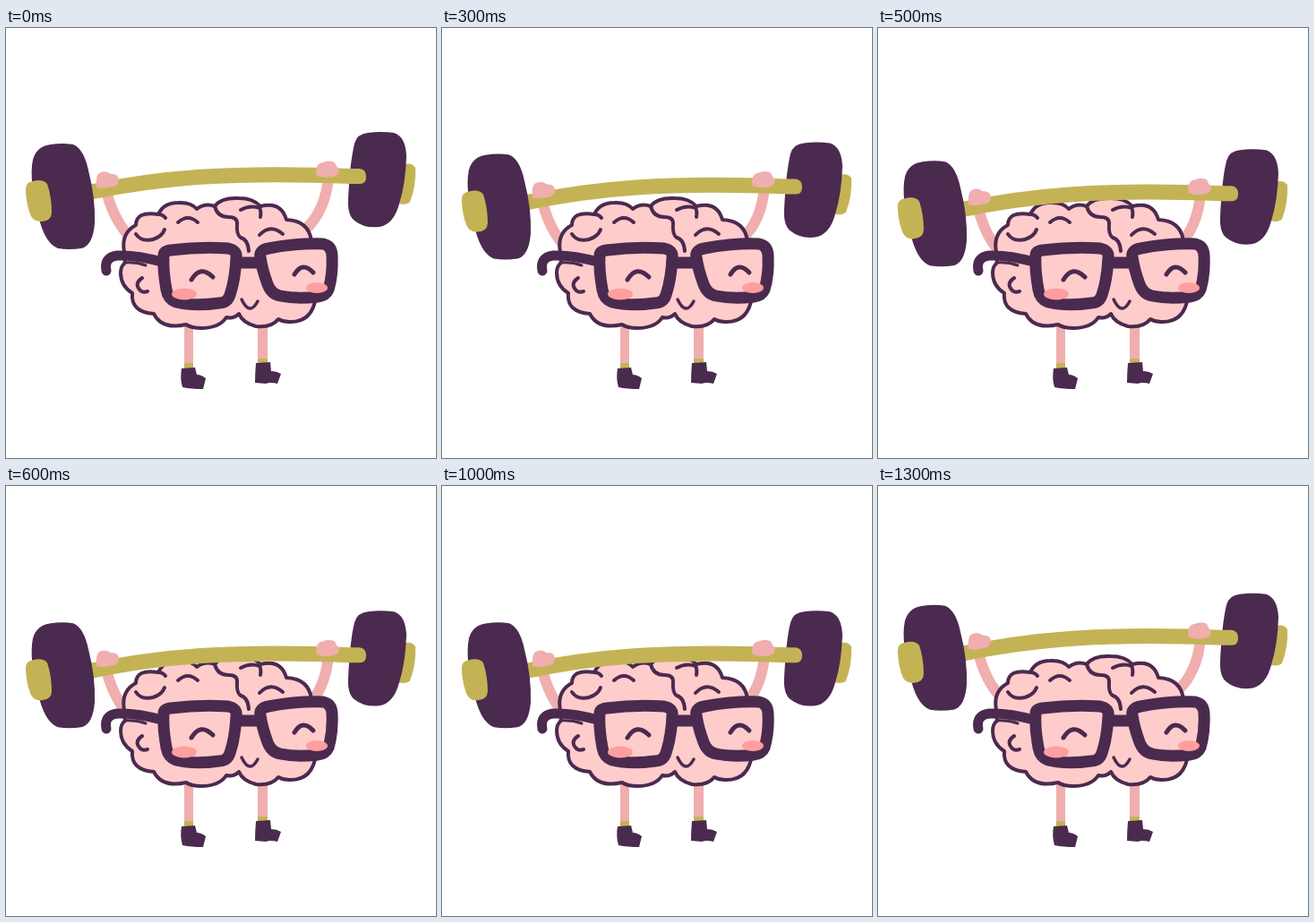
These frames come from a looping animation (480x480 px, 1400 ms). An HTML page:

```html
<!DOCTYPE html>
<html>
<head>
<meta charset="utf-8">
<style>
html, body { margin: 0; width: 100%; height: 100%; overflow: hidden; background: #fff; }
svg { display: block; width: 100%; height: 100%; }
.line { fill: none; stroke: #4b2a4f; stroke-linecap: round; stroke-linejoin: round; }
.dark { fill: #4b2a4f; }
.gold { fill: #c4b355; }
.skin { fill: #f0aeae; }
.arm { fill: none; stroke: #f0aeae; stroke-width: 12; }
.face { fill: #ffcccc; stroke: #4b2a4f; stroke-linejoin: round; }
</style>
</head>
<body>
<svg viewBox="0 0 480 480">
  <!-- legs -->
  <path class="skin" d="M199 325h10v50h-10zM281 325h11v45h-11z"/>
  <path class="gold" d="M199 374h10v7h-10zM281 369h11v6h-11z"/>
  <path class="dark" d="M196 380L211 379L213 387Q218 387 223 391L220 403Q207 403 197 401Q194 391 196 380Z
    M279 374L295 373L296 383Q302 383 307 386L303 397Q295 395 290 397L278 396Q278 385 279 374Z"/>

  <g class="lift">
    <path class="arm" d="M110 173Q118 215 143 238"/>
    <path class="arm" d="M360 165Q357 204 334 225"/>
  </g>

  <!-- brain -->
  <path class="face" stroke-width="4" d="M132 250Q128 229 145 220Q145 204 170 208
    Q176 195 192 195Q206 194 213 202Q222 195 233 199Q240 189 260 190Q276 190 284 199
    Q307 193 313 214Q338 215 341 238L346 300Q342 329 316 328Q309 328 304 325
    Q296 335 279 333Q264 329 260 319Q254 325 246 323Q238 335 218 335Q207 335 201 331
    Q174 337 165 319Q139 317 141 296Q128 288 128 273Q128 266 133 262Z"/>
  <g class="line" stroke-width="4">
    <path d="M145 230Q151 239 164 236Q174 233 177 225M170 208Q175 208 178 212"/>
    <path d="M192 217Q203 207 214 217M283 231Q295 218 309 230"/>
    <path d="M233 199Q236 211 248 211Q258 211 258 218Q257 231 262 234Q270 236 271 249"/>
    <path d="M262 203Q273 197 283 201Q285 204 284 211"/>
    <path d="M152 279Q143 285 149 292Q152 296 158 294"/>
    <path d="M132 262Q145 261 156 265" stroke-width="3"/>
    <path d="M263 303Q272 322 281 305" stroke-width="3.5"/>
  </g>

  <!-- glasses -->
  <path class="line" stroke-width="11" d="M112 271Q109 256 124 254Q145 253 174 261"/>
  <path class="line" stroke-width="13" d="M258 262H285"/>
  <g class="face" stroke-width="13">
    <path d="M176 254Q176 249 184 248Q215 244 248 246Q258 248 257 256Q256 280 250 298
      Q247 307 238 307Q210 311 190 306Q181 303 179 292Q175 270 176 254Z"/>
    <path d="M284 256Q282 248 293 246Q325 240 354 241Q364 243 364 255Q365 275 360 292
      Q357 299 348 300Q325 303 306 299Q296 297 292 286Q286 270 284 256Z"/>
  </g>
  <g fill="#ff9e9e">
    <ellipse cx="199" cy="297" rx="14" ry="6.5"/>
    <ellipse cx="347" cy="290" rx="12" ry="6"/>
  </g>
  <path class="line" stroke-width="5" d="M207 281Q217 264 231 278M322 275Q331 260 343 273"/>

  <!-- barbell and hands -->
  <g class="lift">
    <path class="gold" d="M443 153Q452 149 457 156Q458 176 451 194Q447 198 438 196Z"/>
    <path class="dark" d="M389 129Q392 118 404 117Q418 115 433 117Q446 121 447 143Q446 174 439 196
      Q433 219 417 222Q400 224 389 215Q381 209 382 191Q384 149 389 129Z"/>
    <path fill="none" stroke="#c4b355" stroke-width="17" d="M90 184C170 167 250 160 386 165.5"/>
    <path class="gold" d="M385 157H395Q402 158 402 166Q402 174 395 174H385Z"/>
    <path class="dark" d="M30 147Q34 132 50 130Q63 128 75 130Q87 135 92 159Q100 190 99 218
      Q97 243 84 246Q70 248 58 246Q45 241 38 217Q25 170 30 147Z"/>
    <path class="gold" d="M22 180Q22 172 30 171Q41 168 46 174Q51 189 51 206Q51 215 40 216
      Q29 217 26 205Q22 192 22 180Z"/>
    <path class="skin" d="M101 176Q100 165 104 162Q111 158 117 163Q125 162 126 169Q126 176 119 177Q110 180 101 178Z"/>
    <path class="skin" d="M346 160Q346 151 354 150Q360 147 367 150Q369 156 372 157Q372 165 365 166Q355 168 347 165Z"/>
  </g>
</svg>
<script>
const lifts = document.querySelectorAll('.lift');
const step = 3.87;

// Lowers one notch per 100 ms, then rises, faster near the end.
function notch(i) {
  if (i <= 8) return i;
  return i < 12 ? 16 - i : 27 - 2 * i;
}

function draw(now) {
  const y = step * notch(Math.floor(now % 1400 / 100));
  for (const g of lifts) g.setAttribute('transform', `translate(0 ${y})`);
  requestAnimationFrame(draw);
}
draw(0);
</script>
</body>
</html>
```
